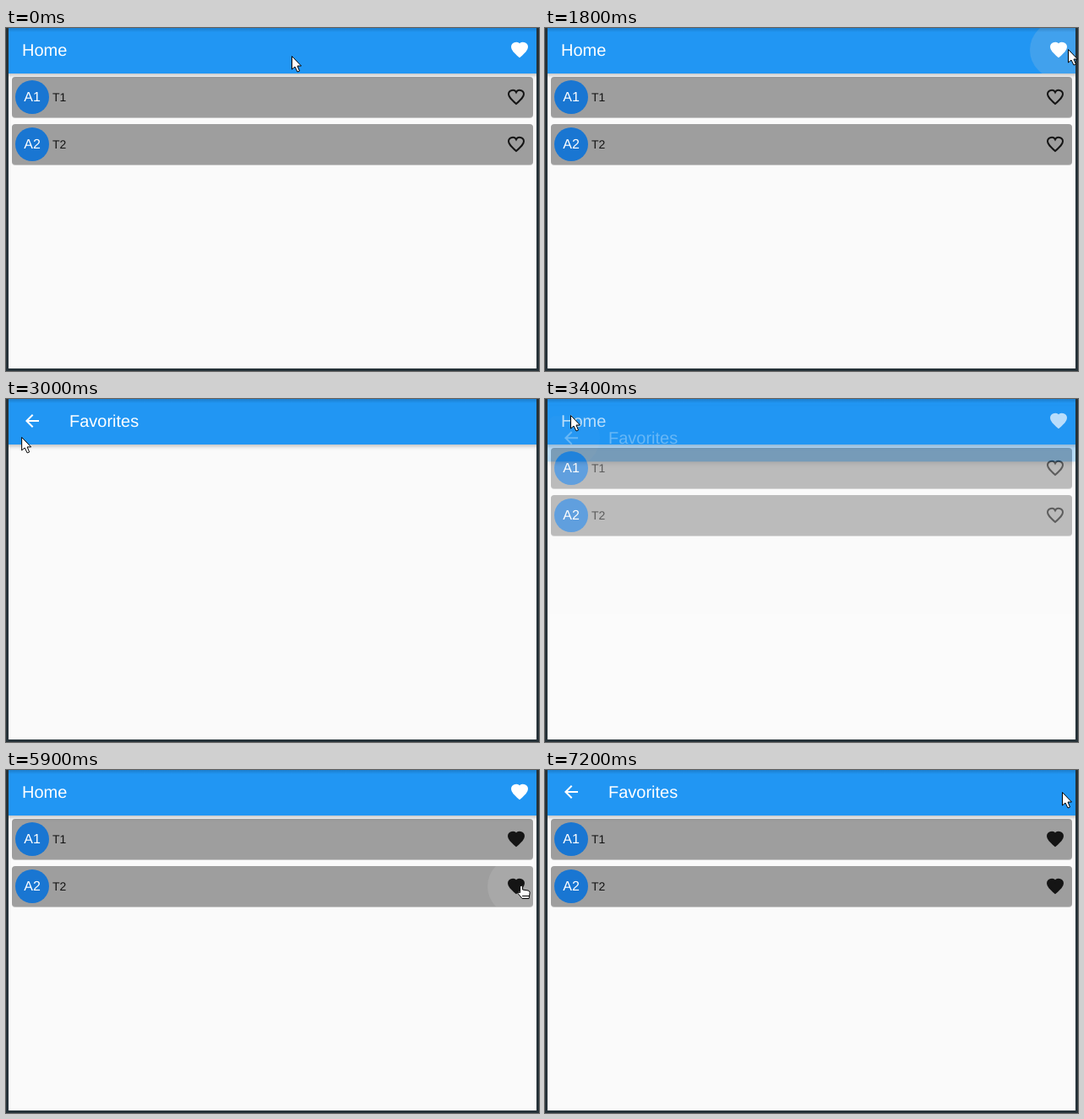
Write an HTML page that moves like this. It is 631 px wide and 407 px high and loops after 8 s.

```html
<!DOCTYPE html>
<html>
<head>
<meta charset="utf-8">
<style>
html, body { margin: 0; height: 100%; overflow: hidden; background: #263238; }
svg { display: block; font-family: "Liberation Sans", Arial, sans-serif; text-rendering: geometricPrecision; }
.bar { fill: #2196f3; filter: drop-shadow(0 2px 2.5px rgba(0,0,0,.25)); }
.card { fill: #9e9e9e; filter: drop-shadow(0 1px .7px rgba(0,0,0,.22)); }
.cursor { fill: #fff; stroke: #000; stroke-linejoin: round; }
</style>
</head>
<body>
<svg id="stage" width="631" height="407"></svg>
<script>
const LOOP = 8000, STEP = 100;
const INK = '#151515';

const HEART = 'M0 8C-5.8 2.8-9-.1-9-3.5C-9-8.2-2-10 0-5.8C2-10 9-8.2 9-3.5C9-.1 5.8 2.8 0 8Z';
const BACK = 'M8 0H-6M.7-7.3L-6.6 0 .7 7.3';
const ARROW = 'M.5.5V16L4 13 7 19 9.5 18 7 12H11.5Z';
const HAND = 'M-1.5 9V1.5Q0-.5 1.5 1.5V5.5L8 6.5Q10 7 10 9L9 16H1L-4 10Q-4.5 7.5-1.5 9ZM1 13H9';

// press times; each press takes effect after DELAY
const OPEN = 1500, RETURN = 3000, LIKES = [4400, 5600], REOPEN = 6700, DELAY = 300;

// pointer moves: start, end, x, y
const MOVES = [
  [300, 700, 461, 19], [800, 1200, 619, 25], [2300, 2900, 14, 54], [2900, 3200, 30, 19],
  [3400, 4100, 607, 90], [4100, 4300, 608, 83], [5100, 5600, 610, 143], [5800, 6500, 612, 26]
];

const clamp = v => Math.min(1, Math.max(0, v));
const smooth = v => v * v * (3 - 2 * v);
const done = (t, press) => t >= press + DELAY;
const slide = (t, press) => clamp((t - press - DELAY) / 190);

function pointer(t) {
  let x = 338, y = 33;
  for (const [start, end, toX, toY] of MOVES) {
    const k = smooth(clamp((t - start) / (end - start)));
    x += (toX - x) * k;
    y += (toY - y) * k;
  }
  const shape = t >= 4100 && t < 6200 ? HAND : ARROW;
  return `<path class="cursor" d="${shape}" transform="translate(${x} ${y})"/>`;
}

const icon = (d, x, y, color, fill = 'none') =>
  `<path d="${d}" stroke="${color}" fill="${fill}" stroke-width="2" transform="translate(${x} ${y})"/>`;

const label = (s, x, y, size, fill, anchor = 'start') =>
  `<text x="${x}" y="${y}" font-size="${size}" fill="${fill}" text-anchor="${anchor}">${s}</text>`;

const clip = (x, y, w, h, inner) =>
  `<svg x="${x}" y="${y}" width="${w}" height="${h}" viewBox="${x} ${y} ${w} ${h}">${inner}</svg>`;

// ink circle that grows after a press and then fades
function splash(t, press, x, y) {
  const age = t - press;
  if (age <= 0 || age >= 500) return '';
  return `<circle cx="${x}" cy="${y}" r="${34 * clamp(.3 + age / 280)}" fill="#d4d4d4" opacity="${.18 * clamp((500 - age) / 200)}"/>`;
}

function card(i, row, t) {
  const y = 58 + 56 * row, mid = y + 24;
  return `<rect class="card" x="7" y="${y}" width="617" height="48" rx="4"/>` +
    clip(7, y, 617, 48, splash(t, LIKES[i], 604, mid)) +
    `<circle cx="31" cy="${mid}" r="20" fill="#1976d2"/>` +
    label('A' + (i + 1), 31, mid + 5, 16, '#fff', 'middle') +
    label('T' + (i + 1), 55, mid + 5, 14, INK) +
    icon(HEART, 604, mid, INK, done(t, LIKES[i]) ? INK : 'none');
}

const page = (items, t, ink, head) =>
  '<rect x="3" width="625" height="404" fill="#fafafa"/>' +
  items.map((i, row) => card(i, row, t)).join('') +
  '<rect class="bar" x="-9" y="-12" width="649" height="66"/>' +
  clip(3, 0, 625, 54, ink) + head;

const home = t => page([0, 1], t,
  splash(t, OPEN, 608, 26) + splash(t, REOPEN, 608, 26),
  label('Home', 19, 33, 20, '#fff') + icon(HEART, 608, 26, '#fff', '#fff'));

const favorites = t => page([0, 1].filter(i => done(t, LIKES[i])), t,
  splash(t, RETURN, 31, 26),
  icon(BACK, 31, 26, '#fff') + label('Favorites', 75, 33, 20, '#fff'));

function draw(t) {
  const p = slide(t, OPEN) - slide(t, RETURN) + slide(t, REOPEN);
  const over = p > 0
    ? `<g opacity="${p ** 1.55}" transform="translate(0 ${101 * (1 - p) ** 2.5})">${favorites(t)}</g>` : '';
  stage.innerHTML =
    '<defs><linearGradient id="edge" x2="0" y2="1"><stop stop-opacity=".16"/><stop offset="1" stop-opacity="0"/></linearGradient></defs>' +
    clip(3, 0, 625, 404, (p < 1 ? home(t) : '') + over +
      '<rect x="3" width="625" height="5" fill="url(#edge)"/>') +
    pointer(t);
}

const stage = document.getElementById('stage');
const begin = performance.now();
let last = -1;
function tick() {
  const t = Math.floor((performance.now() - begin) % LOOP / STEP) * STEP;
  if (t !== last) draw(last = t);
  requestAnimationFrame(tick);
}
tick();
</script>
</body>
</html>
```
